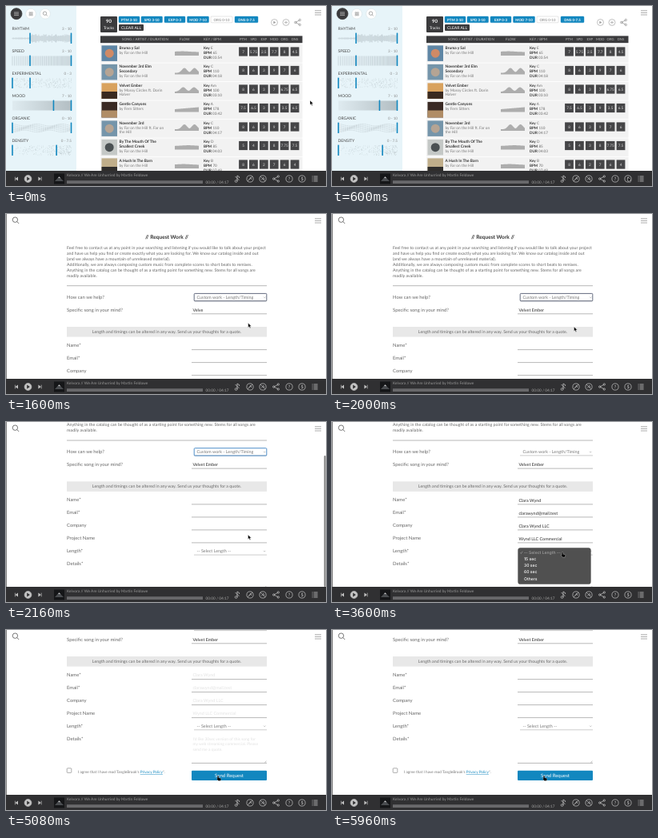
An HTML page for the animation above (6000 ms loop, 400 by 225 pixels).

```html
<!DOCTYPE html>
<html lang="en">
<head>
<meta charset="utf-8">
<title>Request Work</title>
<style>
html, body { margin: 0; width: 100%; height: 100%; overflow: hidden; background: #fff; }
svg { display: block; width: 100vw; height: 100vh; }
text { font-family: Lato, "Open Sans", sans-serif; text-rendering: geometricPrecision; white-space: pre; }
#popup text { font-family: Inter, Roboto, sans-serif; font-weight: 500; }
</style>
</head>
<body>
<svg id="stage" viewBox="0 0 400 225"></svg>
<script>
const LOOP = 6000;
const DARK = '#3b3b3d', BLUE = '#1287bf';

// ---- markup helpers ----
const rect = (x, y, w, h, fill, more = '') =>
  `<rect x="${x}" y="${y}" width="${w}" height="${h}" fill="${fill}" ${more}/>`;
const text = (x, y, size, fill, str, more = '') =>
  `<text x="${x}" y="${y}" font-size="${size}" fill="${fill}" ${more}>${str}</text>`;
const path = (d, stroke, width = .7, fill = 'none', more = '') =>
  `<path d="${d}" stroke="${stroke}" stroke-width="${width}" fill="${fill}" ${more}/>`;
const ring = (x, y, r, stroke, fill = 'none', width = .7) =>
  `<circle cx="${x}" cy="${y}" r="${r}" fill="${fill}" stroke="${stroke}" stroke-width="${width}"/>`;
const group = (id, body, more = '') => `<g id="${id}" ${more}>${body}</g>`;
const BOLD = 'font-weight="700"', MID = 'text-anchor="middle"', END = 'text-anchor="end"';

let seed = 7;
const rand = () => (seed = (seed * 16807) % 2147483647) / 2147483647;

const share = (x, y, c) =>
  path(`M${x + 2.6} ${y - 2.8}L${x - 2.6} ${y}L${x + 2.6} ${y + 2.8}`, c) +
  [[2.8, -3], [-2.8, 0], [2.8, 3]].map(([a, b]) => ring(x + a, y + b, 1.2, c)).join('');
const search = (x, y, r, c, w) =>
  ring(x, y, r, c, 'none', w) + path(`M${x + r * .7} ${y + r * .7}l${r * .8} ${r * .8}`, c, w);

// ---- filter panel ----
const LEFT = 8, SPAN = 73.5;

function wave(kind, cy) {
  const c = '#a9b4b9';
  let d = '';
  if (kind === 3) return rect(LEFT, cy - 6, SPAN, 12, 'url(#mood)');
  if (kind < 2) {
    for (let u = 0; u < 1; u += kind ? .034 - .022 * u : .014) {
      const h = kind ? 6 : (u < .3 ? 1.2 : 5.5) * (.4 + .6 * rand());
      d += `M${LEFT + u * SPAN} ${cy - h}V${cy + h}`;
    }
    return path(d, c, .45);
  }
  if (kind === 4) {
    for (let r = 0; r < 7; r++) {
      d += `M${LEFT} ${cy - 5 + r * 1.7}`;
      for (let x = 2; x <= SPAN; x += 2) d += `l2 ${Math.sin(x * .2 + r * .5) * .5}`;
    }
    return path(d, c, .4, 'none', 'stroke-dasharray="1 .6"');
  }
  for (let i = 0; i < 260; i++) {
    const u = kind === 2 ? rand() : Math.sqrt(rand());
    d += `M${LEFT + u * SPAN} ${cy - 6 + rand() * 12}h.5`;
  }
  return path(d, c, .5);
}

const filters = [
  ['RHYTHM', 3, 10], ['SPEED', 3, 10], ['EXPERIMENTAL', 0, 3],
  ['MOOD', 7, 10], ['ORGANIC', 0, 10], ['DENSITY', 0, 7.5]
];

function panel() {
  let s = rect(0, 0, 88, 206, '#e7f4f9');
  s += ring(13, 9.7, 7, DARK, DARK) + ring(31, 9.7, 6.4, '#d3dde1', '#fff', .5) + ring(49, 9.7, 6.4, '#d3dde1', '#fff', .5);
  s += path('M10 8h6M10 9.8h6M10 11.6h6', '#ccc', .7);
  s += path('M29 7.8h1.6v1.6h-1.6zM31.6 7.8h1.6v1.6h-1.6zM29 10.4h1.6v1.6h-1.6zM31.6 10.4h1.6v1.6h-1.6z', '#777', .5);
  s += search(48.5, 9.2, 2.2, '#777', .6);
  filters.forEach(([name, a, b], i) => {
    const y = 28 * i, cy = 40.5 + y;
    s += text(7.5, 30.2 + y, 5, '#444', name) + text(82, 30.2 + y, 4.6, '#888', `${a} - ${b}`, END);
    s += wave(i, cy);
    for (const v of [a, b]) s += rect(LEFT + SPAN * v / 10 - .8, cy - 7, 1.6, 13.5, BLUE, 'rx=".6"');
  });
  return s;
}

// ---- catalogue ----
const songs = [
  [['Bruma y Sal'], ['by Far on the Hill'], 'E', 65, '03:54', '7 5.75 2.5 7.7 8 4.5'],
  [['November 3rd Elm', 'Secondary'], ['by Far on the Hill'], 'C', 110, '04:18', '8 6 3 9 7 6'],
  [['Velvet Ember'], ['by Mossy Circles ft. Dorin', 'Halver'], 'Am', 100, '03:10', '8 6 3 7 6.75 6.5'],
  [['Gentle Canyons'], ['by Fern Sitters'], 'A', 178, '03:42', '7.5 6.5 3 9 3.5 6.5'],
  [['November 3rd'], ['by Far on the Hill ft. Far on', 'the Hill'], 'C', 110, '04:17', '8 6 3 9 7 6'],
  [['By The Mouth Of The', 'Smallest Creek'], ['by Far on the Hill'], 'D', 85, '04:03', '5 4 3 8 7.75 7.5'],
  [['A Hush In The Barn'], ['by Far on the Hill'], 'B', 70, '07:48', '8 6 2 7 6 4']
];
const covers = [
  ['#5f86a5', '#d08a66'], ['#7595aa', '#b5a494'], ['#d9a25e', '#3a2a20'], ['#3a2a24', '#b08d66'],
  ['#7595aa', '#b5a494'], ['#c4c8c6', '#4a5052'], ['#c0ae8a', '#302e2c']
];

function flow(i, y) {
  const bump = (u, at, w) => Math.exp(-(((u - at) / w) ** 2));
  let d = `M211 ${y + 14}`;
  for (let x = 0; x <= 30; x++) {
    const u = x / 30;
    const h = i === 1 || i === 4 ? 2 + 6 * Math.max(bump(u, .4, .15), bump(u, .82, .15))
      : i === 2 ? 2 + 5.5 * Math.max(bump(u, .35, .16), bump(u, .8, .16)) : i === 3 ? 3.5 + 2.5 * u : 5 + Math.sin(u * 5 + i) * .4;
    d += `L${211 + x} ${y + 14 - h}`;
  }
  return path(d + `V${y + 14}Z`, 'none', 0, '#adadad');
}

function catalogue() {
  let s = rect(118, 13, 21, 20, DARK, 'rx="1"') + text(128.5, 21.3, 6, '#fff', '90', MID + BOLD) + text(128.5, 29, 4.8, '#fff', 'Tracks', MID);
  [['PTM 3-10', 141, 26], ['SPD 3-10', 169, 26.5], ['EXP 0-3', 198, 26], ['MOD 7-10', 226.5, 27], ['ORG 0-10', 256, 27], ['DNS 0-7.5', 286, 29]]
    .forEach(([label, x, w], i) => {
      const off = i === 4;
      s += rect(x, 13, w, 7.8, off ? '#fff' : BLUE, `rx="1" stroke="${off ? '#bbb' : BLUE}" stroke-width=".4"`);
      s += text(x + w / 2, 18.5, 4.4, off ? '#999' : '#fff', label, MID + BOLD);
    });
  s += rect(141, 23, 31, 8, DARK, 'rx="1"') + text(156.5, 28.8, 5, '#fff', 'CLEAR ALL', MID);
  s += ring(335.5, 20.5, 4, '#999', 'none', .6) + path('M334.4 18.8l2.8 1.7l-2.8 1.7z', 'none', 0, '#999');
  s += ring(350, 20.5, 4, '#999', 'none', .6) + path('M348 20.5h4M350 18.5v4', '#999', .6) + share(364.5, 20.5, '#888');
  s += rect(118, 37.4, 252.5, 8.8, DARK);
  s += text(145, 43.4, 4.4, '#bbb', 'SONG / ARTIST / DURATION') + text(217, 43.4, 4.4, '#bbb', 'FLOW') + text(247, 43.4, 4.4, '#bbb', 'KEY / BPM');
  'PTM SPD EXP MOD ORG DNS'.split(' ').forEach((h, i) => s += text(296.5 + 12.9 * i, 43.4, 4.2, '#bbb', h, MID));
  songs.forEach(([title, by, key, bpm, dur, marks], i) => {
    const y = 48 + 23.5 * i, [c1, c2] = covers[i];
    s += rect(118, y, 252.5, 22.7, '#f2f2f2');
    s += rect(119.5, y + 1.4, 19.5, 19.5, c1);
    s += i % 4 > 1 ? rect(119.5, y + 12, 19.5, 8.9, c2) : ring(129.2, y + 11.2, 5.5, 'none', c2);
    let ty = y + 5.8;
    for (const row of title) { s += text(141.5, ty, 4.85, '#333', row, BOLD); ty += 5.8; }
    for (const row of by) { s += text(141.5, ty, 4.8, '#777', row); ty += 5.8; }
    s += flow(i, y);
    [['Key', key], ['BPM', bpm], ['DUR', dur]].forEach(([k, v], j) =>
      s += text(247, y + 5.8 + 5.9 * j, 4.6, '#333', `<tspan ${BOLD}>${k}</tspan> <tspan fill="#666">${v}</tspan>`));
    marks.split(' ').forEach((m, j) => {
      const x = 291.1 + 12.9 * j;
      s += rect(x, y + 3.4, 10.8, 11.2, '#454547') + text(x + 5.4, y + 10.7, 4.7, '#ddd', m, MID);
    });
  });
  return s;
}

// ---- request form, laid out in page coordinates ----
const field = (label, y) => text(76, y, 5.9, '#666', label);
const line = (y, c = '#888', x = 232) => path(`M${x} ${y}H326`, c, .6);
const chevron = y => path(`M322 ${y}l1.2 1.2l1.2-1.2`, '#888', .5);
const value = (id, y) => text(233.5, y, 5.4, '#2a2a2a', '', `id="${id}"`);

function form() {
  let s = text(201, 30.8, 6.6, '#333', '// Request Work //', MID + BOLD);
  ['Feel free to contact us at any point in your searching and listening if you would like to talk about your project',
    'and have us help you find or create exactly what you are looking for. We know our catalog inside and out',
    '(and we always have a mountain of unreleased material).',
    'Additionally, we are always composing custom music from complete scores to short beats to remixes.',
    'Anything in the catalog can be thought of as a starting point for something new. Stems for all songs are',
    'readily available.'].forEach((p, i) => s += text(76, 43.8 + 6.95 * i, 5.25, '#666', p));
  s += path('M76 89.7H326', '#888', .6);
  s += field('How can we help?', 105.6) + field('Specific song in your mind?', 121.8);
  s += group('help', text(238.5, 106, 5.4, '#777', '', 'id="helpText"') + chevron(103.6) + line(108.6, '#aaa', 235)
    + rect(235.2, 99.4, 90.6, 9.4, 'none', 'id="focus" rx="1" stroke-width=".9"'));
  s += group('song', line(124.8) + value('songText', 121.8));

  let r = rect(76, 141, 250, 12.6, '#e8e8e8') + text(201, 149.2, 5.3, '#666', 'Length and timings can be altered in any way. Send us your thoughts for a quote.', MID);
  ['Name*', 'Email*', 'Company', 'Project Name', 'Length*', 'Details*'].forEach((l, i) => {
    r += field(l, 166 + 16 * i);
    if (i < 4) r += line(169.6 + 16 * i);
  });
  r += text(238.5, 230.1, 5.4, '#777', '', 'id="lenText"') + chevron(227.6) + line(232.8, '#aaa', 235);
  r += line(274.4) + path('M323.4 273.6l2-2M324.6 273.6l.8-.8', '#777', .4);
  r += group('values', ['name', 'mail', 'firm', 'project'].map((id, i) => value(id, 166.4 + 16 * i)).join('')
    + [0, 1, 2].map(i => text(233.5, 245.8 + 6.5 * i, 4.95, '#2a2a2a', '', `id="note${i}"`)).join(''));
  r += rect(76.2, 280.8, 5.6, 5.6, '#fff', 'id="box" rx=".8" stroke="#777" stroke-width=".6"');
  r += path('M77.4 283.6l1.3 1.4l2-2.8', '#fff', .8, 'none', 'id="tick"');
  r += text(90, 287, 4.7, '#777', `I agree that I have read TangleBrook's <tspan fill="${BLUE}" text-decoration="underline">Privacy Policy</tspan>*.`);
  r += rect(232, 283.8, 94, 12.2, '#595959', 'id="button" rx="1"') + text(279, 292, 6, '#fff', 'Send Request', MID);
  s += group('rest', r);

  s += group('menu', rect(232, 99, 95, 36, '#fff')
    + text(240, 115.2, 5.4, '#555', 'Custom work', 'clip-path="url(#strip)"') + text(240, 123, 5.4, '#555', 'You with us', 'clip-path="url(#strip)"')
    + path('M283 121.8H305', '#777', .5) + path('M322 104.2h3.5M322 108.7h4M322 124.8h4', '#999', .5)
    + rect(235, 125.6, 87, 7.6, '#dff2f8') + text(240, 131.3, 5.4, '#fff', 'Custom work'));

  const opts = ['-- Select Length --', '15 sec', '30 sec', '60 sec', 'Others'];
  s += group('popup', rect(232.6, 224.2, 90.8, 45, '#505050', 'rx="2.6" stroke="#3c3c3c" stroke-width=".4"')
    + rect(232.6, 242.4, 90.8, 8, '#1b76d8', 'id="hover"')
    + path('M235.4 230l1 1.2l1.8-2.8', '#aaa', .6)
    + opts.map((o, i) => text(240, 231.9 + 8.1 * i, 5.1, i ? '#fff' : '#a0a0a0', o)).join(''));
  return s;
}

// ---- player bar ----
function player() {
  const c = '#c4c4c4';
  let s = rect(0, 206, 400, 19, '#303032');
  s += path('M15 213.6v4.8l-3.4-2.4z', 'none', 0, c) + path('M11.4 213.6v4.8', c);
  s += ring(27.5, 216, 4.4, c, c) + path('M26.2 213.6l3.6 2.4l-3.6 2.4z', 'none', 0, '#303032');
  s += path('M40.4 213.6v4.8l3.4-2.4z', 'none', 0, c) + path('M44.2 213.6v4.8', c);
  s += rect(60, 209.5, 13, 13, '#151618') + path('M61 219l5-5.5l2 1.5l4 4z', 'none', 0, '#4a4d50') + path('M65 214.8l1.4-1.6l2 2z', 'none', 0, '#c8c8c8');
  s += text(76, 213.4, 4.85, '#999', 'Kelvora // We Are Unhurried by Martin Feldowe');
  s += rect(76, 218.2, 170, 3.8, '#69696b') + text(249.5, 222, 4.75, '#a5a5a5', '00:00 / 04:17');
  s += path('M289 219v-7l2.6 1.6v1.4M286.6 213l4.8 4.8', c, .8) + ring(287.6, 219, 1.4, c);
  for (const [x, k] of [[305, 1], [321, -1]])
    s += ring(x, 216, 4.1, c) + path(`M${x - 2.8} ${216 + 2.8 * k}L${x + 2.8} ${216 - 2.8 * k}`, c) + path(`M${x - 1.6} 217.6l2.4-3.4l1 2.8`, c, .6);
  s += share(337.5, 216, c);
  for (const [x, ch] of [[354, '?'], [370, '$']]) s += ring(x, 216, 4.1, c) + text(x, 218, 5.6, c, ch, MID);
  for (let i = 0; i < 4; i++) s += path(`M382.6 ${213 + 2 * i}h1M384.6 ${213 + 2 * i}h5`, c, .8);
  return s;
}

const stage = document.getElementById('stage');
stage.innerHTML = `<defs>
  <linearGradient id="mood"><stop offset="0" stop-color="#dfebf0"/><stop offset="1" stop-color="#b3bec3"/></linearGradient>
  <clipPath id="strip"><path d="M238 110.5h32v4h-32zM238 118.6h26v4h-26z"/></clipPath></defs>`
  + rect(0, 0, 400, 225, '#fff')
  + group('catalogue', catalogue()) + group('panel', panel())
  + group('request', rect(0, 0, 400, 206, '#fff') + group('form', form())
    + path('M.4 0V206', '#555', .8) + search(11.4, 7.2, 3.2, '#555', .8))
  + path('M386 5.8h8M386 8.4h8M386 11h8', '#888', .7)
  + rect(397.6, 0, 2, 164, '#7c7c7c', 'id="thumb" rx="1"')
  + player()
  + group('arrow', path('M0 0v5.6l1.3-1.2l1 2.1l1-.5l-1-2h1.8z', '#fff', .4, '#000'))
  + group('hand', path('M0 0q.9 0 .9.9v1.8l2.2.5q.9.3.7 1.2l-.6 2.2h-2.8l-1.9-2.4q0-.8.7-.7V.9q0-.9.8-.9z', '#fff', .3, '#000'));

const el = {};
stage.querySelectorAll('[id]').forEach(n => el[n.id] = n);
const set = (id, name, v) => el[id].setAttribute(name, v);
const write = (id, s) => { if (el[id].textContent !== s) el[id].textContent = s; };
const show = (id, on) => set(id, 'opacity', +on);

// ---- motion ----
const prog = (t, a, b) => Math.min(1, Math.max(0, (t - a) / (b - a)));
const ease = u => u * u * (3 - 2 * u);
const between = (t, a, b) => t >= a && t < b;
const typed = (s, t, a, b) => s.slice(0, Math.round(s.length * prog(t, a, b)));

const entries = [
  ['songText', 'Velvet Ember', 1520, 1720], ['name', 'Clara Wynd', 2220, 2360], ['mail', 'clarawynd@mail.test', 2400, 2540],
  ['firm', 'Clara Wynd LLC', 2580, 2720], ['project', 'Wynd LLC Commercial', 2920, 3140]
];
const note = ["I'd like 30sec version of this song for", 'my web streaming commercial. Please', 'send me a quote.'];
const route = [
  [40, 380, 118], [440, 370, 214], [720, 370, 214], [920, 303, 126], [1400, 303, 126], [1720, 302.5, 141],
  [3160, 302.5, 141], [3300, 286, 162.5], [3520, 286, 162.5], [3600, 288, 162.5], [3760, 288, 162.5], [3840, 284, 180],
  [4140, 284, 180], [4260, 79, 174], [4400, 79, 174], [4600, 265, 182], [LOOP, 265, 182]
];

function pointer(t) {
  const i = route.findIndex(p => p[0] > t);
  if (i < 1) return route[0].slice(1);
  const [a, x, y] = route[i - 1], [b, X, Y] = route[i], u = ease(prog(t, a, b));
  return [x + (X - x) * u, y + (Y - y) * u];
}

function render(t) {
  show('catalogue', 1 - prog(t, 600, 780));
  set('panel', 'transform', `translate(${-89 * ease(prog(t, 600, 800))} 0)`);
  show('request', prog(t, 700, 900));

  const scroll = 66.7 * ease(prog(t, 2040, 2155)) + 41.3 * ease(prog(t, 3870, 3970));
  set('form', 'transform', `translate(0 ${-scroll})`);
  set('thumb', 'y', scroll * .63);
  show('thumb', prog(t, 2030, 2060) * (1 - prog(t, 2220, 2340)) + prog(t, 3860, 3880) * (1 - prog(t, 4040, 4200)));

  show('menu', between(t, 1120, 1360));
  show('rest', prog(t, 1400, 1500));
  write('helpText', t < 1360 ? '-- Select --' : 'Custom work - Length/Timing');
  show('focus', between(t, 1360, 2220));
  set('focus', 'stroke', t < 2080 ? '#525a70' : '#3d84c4');

  for (const [id, s, a, b] of entries) write(id, typed(s, t, a, b));
  let left = Math.round(note.join('').length * prog(t, 3960, 4150));
  note.forEach((s, i) => { write('note' + i, s.slice(0, Math.max(0, left))); left -= s.length; });
  show('values', 1 - prog(t, 4960, 5100));

  show('popup', between(t, 3300, 3860));
  show('hover', t >= 3800);
  write('lenText', between(t, 3860, 5040) ? '30 sec' : '-- Select Length --');

  const checked = between(t, 4260, 5040);
  show('tick', checked);
  set('box', 'fill', checked ? '#1b76d8' : '#fff');
  set('button', 'fill', t < 4520 ? '#595959' : between(t, 4800, 4960) ? '#0d719f' : BLUE);

  const [x, y] = pointer(t);
  const hand = between(t, 420, 560) || between(t, 1120, 1400) || between(t, 3300, 3860) || t >= 4220;
  show('hand', hand);
  show('arrow', !hand);
  set(hand ? 'hand' : 'arrow', 'transform', `translate(${x} ${y})`);
}

const start = performance.now();
function tick() {
  render((performance.now() - start) % LOOP);
  requestAnimationFrame(tick);
}
render(0);
requestAnimationFrame(tick);
</script>
</body>
</html>
```
